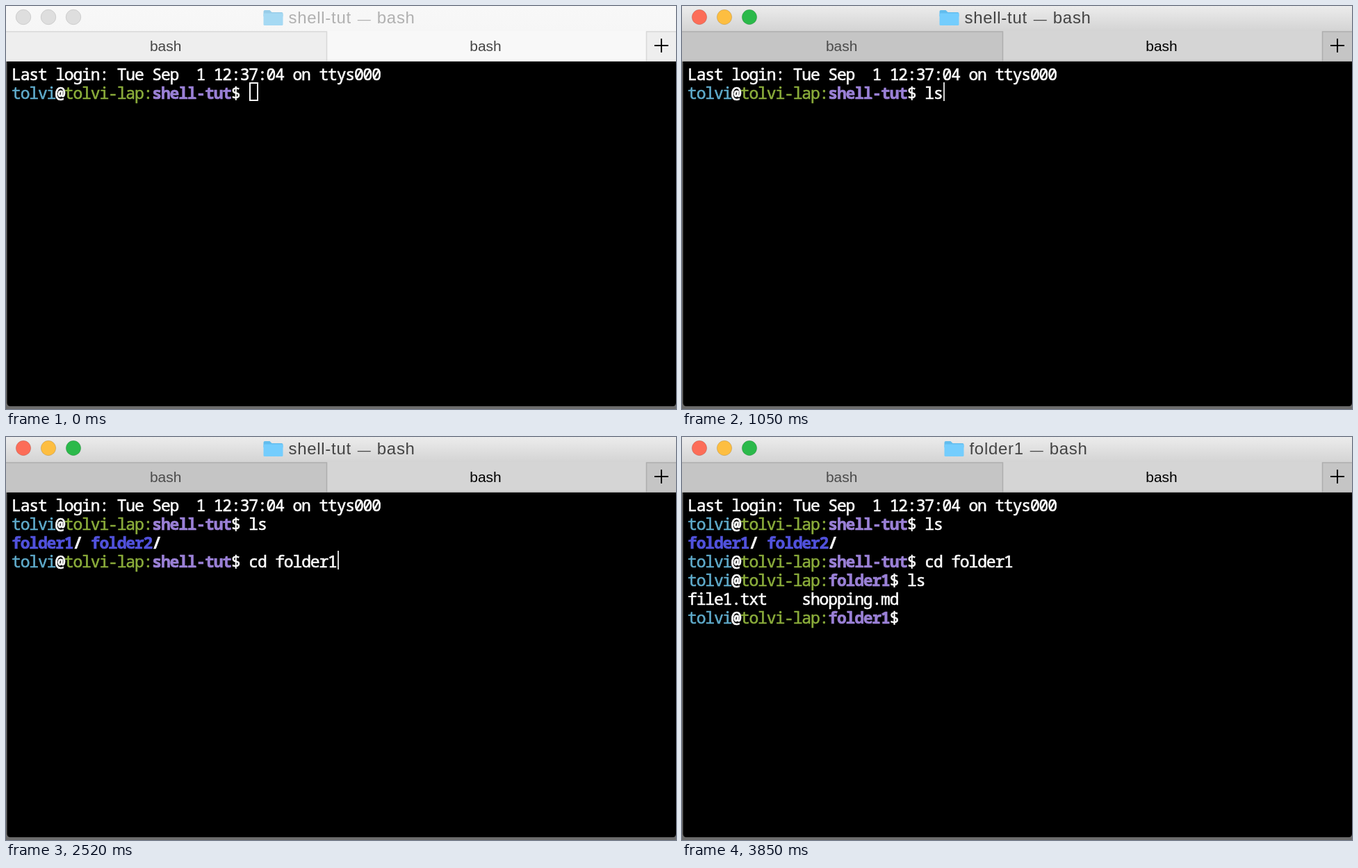
Recreate the animation shown at these times as an HTML page. Size 964 px wide and 581 px high, loop 3.99 s.

```html
<!DOCTYPE html>
<html lang="en">
<head>
<meta charset="utf-8">
<title>Terminal</title>
<style>
  html, body { margin: 0; width: 100%; height: 100%; overflow: hidden; background: #f7f7f7; }
  #stage { position: relative; width: 964px; height: 581px; overflow: hidden; }
  svg { position: absolute; left: 0; top: 0; font-family: "Liberation Sans", Arial, sans-serif; }
  #title { font-size: 24px; letter-spacing: .7px; }
  .tab { font-size: 21px; text-anchor: middle; }

  /* unfocused window, then the focused colours */
  #stage { --top: #f8f8f8; --low: #f6f6f6; --back: #eeeeee; --front: #f8f8f8; --line: #d8d8d8;
    --title: #b1b1b1; --label: #454545; --on: #454545; --folder: #a5d9f3; --flap: #98cde9;
    --red: #dedede; --yellow: #dedede; --green: #dedede; --rim: #cdcdcd; }
  #stage.focus { --top: #ececec; --low: #d3d3d3; --back: #c5c5c5; --front: #d5d5d5; --line: #aeaeae;
    --title: #444; --label: #4b4b4b; --on: #000; --folder: #74cdfd; --flap: #62bdee;
    --red: #fc6d58; --yellow: #fdbe41; --green: #2bb94a; --rim: #0002; }

  #screen { position: absolute; left: 8px; top: 85px; margin: 0; color: #fff;
    font: 23px/27px "Noto Sans Mono", "DejaVu Sans Mono", monospace; letter-spacing: -1.16px;
    -webkit-text-stroke: .6px; }
  #screen b { font-weight: 700; }
  .user { color: #5fabcb; }
  .host { color: #8bad3b; }
  .dir { color: #9a80d6; }
  .folder { color: #5152dc; }
  #cursor { position: absolute; box-sizing: border-box; width: 2px; height: 27px; background: #d4d4d4; }
  #cursor.hollow { width: 13px; background: none; border: 2px solid #fff; }
</style>
</head>
<body>
<div id="stage">
  <svg width="964" height="581">
    <defs>
      <linearGradient id="bar" x2="0" y2="1">
        <stop stop-color="var(--top)"/>
        <stop offset="1" stop-color="var(--low)"/>
      </linearGradient>
    </defs>
    <rect width="964" height="37" fill="url(#bar)"/>
    <g stroke="var(--rim)">
      <circle cx="25" cy="16" r="10.7" fill="var(--red)"/>
      <circle cx="61" cy="16" r="10.7" fill="var(--yellow)"/>
      <circle cx="97" cy="16" r="10.7" fill="var(--green)"/>
    </g>
    <g id="heading">
      <path d="M0 8q0-2 2-2h7l3 3h14q2 0 2 2v4H0z" fill="var(--flap)"/>
      <rect y="10.5" width="28" height="17.5" rx="1.5" fill="var(--folder)"/>
      <text id="title" x="36" y="25" fill="var(--title)"><tspan id="place"></tspan> <tspan font-size="19" dx="1.5">—</tspan> <tspan dx="1">bash</tspan></text>
    </g>
    <rect y="37" width="964" height="43" fill="var(--back)"/>
    <rect x="462" y="36" width="459" height="44" fill="var(--front)"/>
    <path d="M0 37H461.5V80M964 37H921.5V80" fill="none" stroke="var(--line)" stroke-width="1.5"/>
    <path d="M0 79H964" stroke="var(--line)"/>
    <text class="tab" x="229.7" y="65" fill="var(--label)">bash</text>
    <text class="tab" x="690" y="65" fill="var(--on)">bash</text>
    <path d="M933 57H953M943 47V67" stroke="#000" stroke-width="2"/>
    <rect y="80" width="964" height="501" fill="#6c6c6c"/>
    <path d="M1.5 80H964V572q0 5-5 5H6.5q-5 0-5-5z" fill="#000"/>
  </svg>
  <pre id="screen"></pre>
  <div id="cursor"></div>
</div>
<script>
const LOOP = 3990, FOCUS = 210, COL = 12.64, ROW = 27;
const HIDDEN = [[210, 560], [3710, LOOP]];

const tag = (name, cls, text) => `<${name} class="${cls}">${text}</${name}>`;
const prompt = dir => tag('span', 'user', 'tolvi') + '<b>@</b>' +
  tag('span', 'host', 'tolvi-lap:') + tag('b', 'dir', dir) + '$ ';
const folder = name => tag('b', 'folder', name) + '<b>/</b>';

// keys holds the time of each typed character
const commands = [
  { dir: 'shell-tut', text: 'ls', keys: [840, 980], enter: 1120,
    output: folder('folder1') + ' ' + folder('folder2') },
  { dir: 'shell-tut', text: 'cd folder1', enter: 2660,
    keys: [1400, 1540, 1680, 1820, 1960, 2030, 2170, 2310, 2450, 2520] },
  { dir: 'folder1', text: 'ls', keys: [3010, 3150], enter: 3290,
    output: 'file1.txt    shopping.md' },
  { dir: 'folder1', text: '', keys: [], enter: Infinity }
];

const [stage, heading, place, screen, cursor] =
  ['stage', 'heading', 'place', 'screen', 'cursor'].map(id => document.getElementById(id));
let shown = '';

function draw(t) {
  const lines = ['Last login: Tue Sep  1 12:37:04 on ttys000'];
  let dir, col;
  for (const c of commands) {
    const typed = c.text.slice(0, c.keys.filter(k => k <= t).length);
    dir = c.dir;
    col = `tolvi@tolvi-lap:${dir}$ ${typed}`.length;
    lines.push(prompt(dir) + typed);
    if (t < c.enter) break;
    if (c.output) lines.push(c.output);
  }

  const focus = t >= FOCUS;
  stage.classList.toggle('focus', focus);
  cursor.classList.toggle('hollow', !focus);
  cursor.hidden = HIDDEN.some(([from, to]) => t >= from && t < to);
  cursor.style.left = Math.round(9 + col * COL) + 'px';
  cursor.style.top = 83 + (lines.length - 1) * ROW + 'px';

  const html = lines.join('\n');
  if (html === shown) return;
  shown = html;
  screen.innerHTML = html;
  place.textContent = dir;
  heading.setAttribute('transform', `translate(${dir === 'folder1' ? 377.5 : 370.5})`);
}

const start = performance.now();
function tick() {
  draw((performance.now() - start) % LOOP);
  requestAnimationFrame(tick);
}
tick();
</script>
</body>
</html>
```
